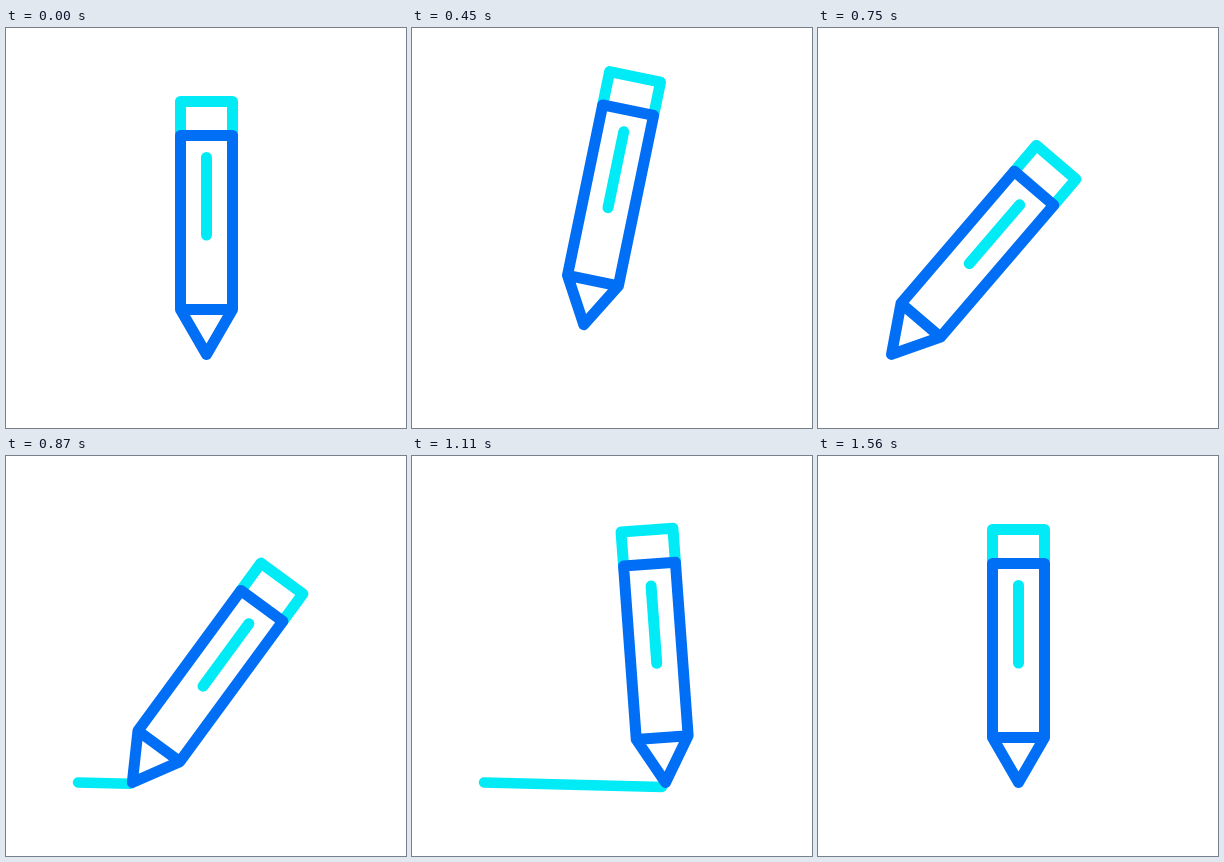
Write an HTML page that moves like this. It is 400 by 400 pixels and loops after 1650 ms.

```html
<!DOCTYPE html>
<html lang="en">
<head>
<meta charset="utf-8">
<title>Pencil</title>
<style>
  html, body { margin: 0; width: 100%; height: 100%; overflow: hidden; background: #fff; }
  svg { display: block; width: 100vw; height: 100vh; }
  path { fill: none; stroke-width: 11; stroke-linecap: round; stroke-linejoin: round; }
  .cyan { stroke: #00ebf5; }
  .blue { stroke: #006ff5; }
  #line { stroke-width: 10.5; }
</style>
</head>
<body>
<svg viewBox="0 0 400 400">
  <path id="line" class="cyan"/>
  <!-- the pencil's tip is at 0,0 -->
  <g id="pencil">
    <path class="cyan" d="M-26 -219V-253H26V-219"/>
    <path class="cyan" d="M0 -197V-119.5"/>
    <path class="blue" d="M-26 -219H26V-45H-26ZM-26 -45L0 0L26 -45"/>
  </g>
</svg>
<script>
const LOOP = 1650, STEP = 30;
const LEFT = 72, RIGHT = 250, FLOOR = 326.5;
const pencil = document.getElementById('pencil');
const line = document.getElementById('line');

// Sine ease from 0 to 1 between two times.
function ease(t, start, end) {
  const p = Math.min(1, Math.max(0, (t - start) / (end - start)));
  return (1 - Math.cos(Math.PI * p)) / 2;
}

const lineY = x => FLOOR + (x - LEFT) * 0.025;

function draw(t) {
  const home = ease(t, 1260, 1500);
  const x = 200.5 - 129 * ease(t, 300, 780) + 182 * ease(t, 735, 1100) - 53 * home;
  const y = FLOOR - 46 * (ease(t, 295, 555) - ease(t, 555, 755));
  const tilt = 40.6 * ease(t, 295, 725) - 53.5 * ease(t, 790, 1225) + 12.9 * home;
  pencil.setAttribute('transform', `translate(${x} ${y}) rotate(${tilt})`);

  // The line follows the tip, then vanishes from its left end.
  const from = LEFT + (RIGHT - LEFT) * ease(t, 1130, 1555);
  const to = t < 1100 ? Math.min(RIGHT, Math.max(LEFT, x - 2)) : RIGHT;
  const shown = t > 750 && t < 1555;
  line.setAttribute('d', shown ? `M${from} ${lineY(from)}L${to} ${lineY(to)}` : '');
}

function frame() {
  const t = performance.now() % LOOP;
  draw(Math.floor(t / STEP) * STEP);
  requestAnimationFrame(frame);
}
frame();
</script>
</body>
</html>
```
